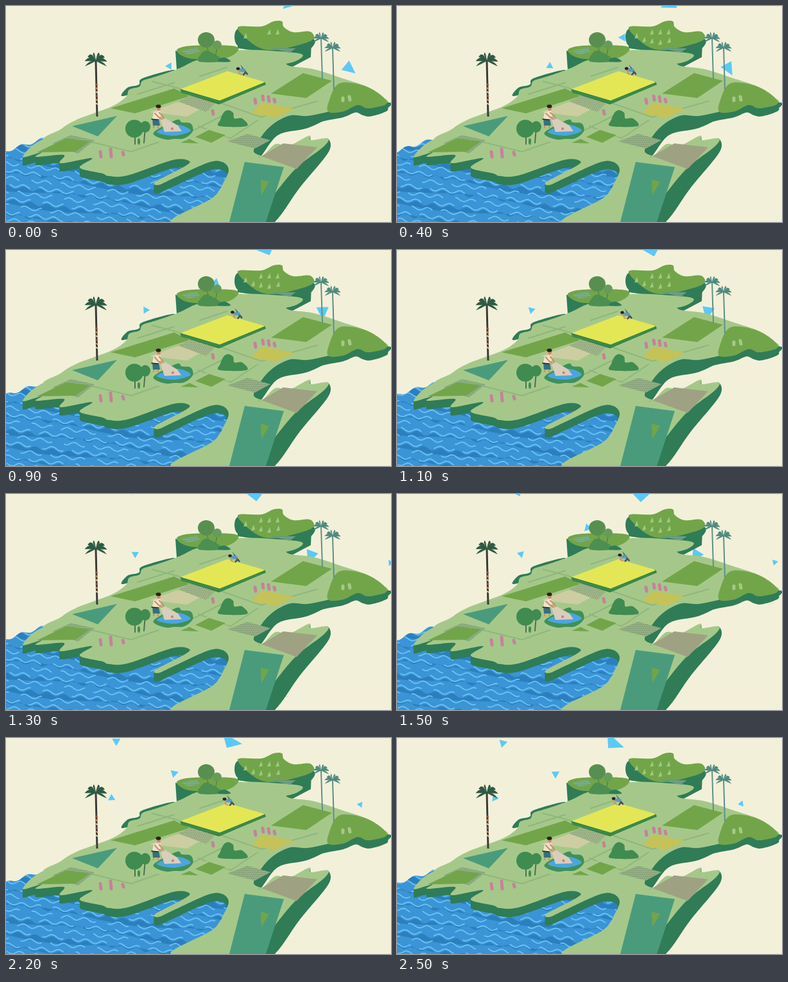
Write an HTML page with a canvas that moves like this. It is 600 by 338 pixels and loops after 2.6 s.

```html
<!DOCTYPE html>
<html lang="en">
<head>
<meta charset="utf-8">
<title>Farmland</title>
<style>
html, body { margin: 0; width: 100%; height: 100%; overflow: hidden; background: #f3f0da; }
canvas { display: block; width: 600px; height: 338px; }
</style>
</head>
<body>
<canvas id="stage" width="600" height="338"></canvas>
<script>
const LOOP = 2600, STEP = 100, W = 600, H = 338, RAD = Math.PI / 180;
const C = { sky: '#f3f0da', light: '#a5c88a', dark: '#2f7c57', field: '#72a549', teal: '#4a9b7c',
  bush: '#3f8b50', pink: '#c6829a', kite: '#5bc9f7', path: '#8fb67c', skin: '#c98f6b', ink: '#25221f' };
const stage = document.getElementById('stage').getContext('2d');
const sheet = document.createElement('canvas');
sheet.width = W;
sheet.height = H;
let g = stage;

const points = s => s.trim().split(/\s+/).map(p => p.split(',').map(Number));

function poly(s) {
  const p = new Path2D();
  points(s).forEach(([x, y]) => p.lineTo(x, y));
  p.closePath();
  return p;
}

// Closed curve through all points (Catmull-Rom)
function blob(s) {
  const q = points(s), n = q.length, p = new Path2D(), at = i => q[(i + n) % n];
  p.moveTo(...q[0]);
  for (let i = 0; i < n; i++) {
    const [a, b, c, d] = [at(i - 1), at(i), at(i + 1), at(i + 2)];
    p.bezierCurveTo(b[0] + (c[0] - a[0]) / 6, b[1] + (c[1] - a[1]) / 6,
      c[0] - (d[0] - b[0]) / 6, c[1] - (d[1] - b[1]) / 6, c[0], c[1]);
  }
  p.closePath();
  return p;
}

function fill(color, path) {
  g.fillStyle = color;
  g.fill(path);
}

function oval(color, x, y, rx, ry = rx) {
  g.fillStyle = color;
  g.beginPath();
  g.ellipse(x, y, rx, ry, 0, 0, 7);
  g.fill();
}

function line(color, width, s, cap = 'round') {
  g.strokeStyle = color;
  g.lineWidth = width;
  g.lineCap = cap;
  g.beginPath();
  points(s).forEach(([x, y]) => g.lineTo(x, y));
  g.stroke();
}

function dotted(path, color, dot) {
  fill(color, path);
  g.save();
  g.clip(path);
  g.fillStyle = dot;
  for (let y = 0; y < H; y += 3)
    for (let x = y % 2; x < W; x += 3) g.fillRect(x, y, 1, 1);
  g.restore();
}

const north = blob(`60,212 85,193 110,178 165,157 187,142 192,131 208,126 213,117 235,110 269,98
  300,84 350,76 362,69 415,72 441,72 438,92 480,99 530,115 562,126 588,143 594,151 565,160 548,153
  526,161 505,165 470,172 440,172 408,192 386,226 397,236 330,235 150,230`);
const south = blob(`26,236 60,208 140,200 300,200 380,228 397,236 420,216 440,219 472,203 475,210
  501,207 495,220 450,256 404,312 376,339 257,339 322,300 339,276 347,256 337,244 315,245 260,270
  238,280 233,275 275,253 286,243 260,241 190,265 160,266 150,262 115,253 134,238 85,246 90,233
  47,236 55,229`);

function palm(x, y, foot, r, leaf, trunk, width) {
  line(trunk, width, `${x},${y} ${x + 2},${foot}`, 'butt');
  for (const a of [-165, -135, -105, -70, -40, -12, 18, 162]) {
    const dx = Math.cos(a * RAD) * r, dy = Math.sin(a * RAD) * r * .8, droop = r * .28;
    const p = new Path2D();
    p.moveTo(x, y);
    p.quadraticCurveTo(x + dx * .6, y + dy - droop, x + dx, y + dy + droop);
    p.quadraticCurveTo(x + dx * .5, y + dy * .6 + r * .18, x, y + 1);
    fill(leaf, p);
  }
}

function drawGround() {
  fill(C.dark, blob('183,141 189,128 207,123 213,113 262,100 240,120'));
  fill(C.dark, poly('264,70 320,84 266,99'));
  fill(C.dark, poly('361,33 361,66 415,74 441,98 475,80 476,55'));
  for (let dy = 1; dy <= 13; dy++) {
    g.save();
    g.translate(0, dy);
    fill(C.dark, north);
    fill(C.dark, south);
    g.restore();
  }
  fill(C.dark, blob(`386,226 408,190 440,171 510,164 594,151 594,161 582,169 560,172
    542,166 510,173 470,191 424,202 396,236`));
  fill(C.dark, blob('501,207 503,228 458,284 414,342 372,342 428,276 492,222'));
  fill(C.light, north);
  fill(C.light, south);
}

function drawHills() {
  fill(C.dark, blob('361,36 361,62 400,68 455,76 474,68 476,50 400,44'));
  fill(C.light, blob('368,70 412,70 462,76 438,90 380,86'));
  fill(C.field, blob('361,34 398,32 417,24 430,24 433,33 448,41 474,40 476,54 425,68 392,64'));
  dotted(poly('412,66 452,66 442,73'), '#6f9f80', '#4b8480');
  fill(C.field, blob('266,69 290,62 350,62 362,69 340,82 286,82'));
  dotted(poly('273,70 298,65 302,72 284,76'), '#7fae7c', '#4b8f86');
  line('#4f6f4c', 1, '313,64 318,78');
  line('#4f6f4c', 1, '329,66 326,80');
  oval('#588f50', 312, 53, 13, 12);
  oval('#669c58', 329, 61, 7);
  fill('#4c8f50', blob('301,87 304,75 314,70 334,81 336,87'));
  fill(C.dark, blob('331,87 334,82 342,81 350,87'));
  fill(C.field, blob('503,166 503,150 520,121 564,127 594,151 565,160 548,155 526,165'));
  line(C.light, 5, '525,144 525,148');
  line(C.light, 5, '535,142 536,147');
}

function drawFields() {
  for (const s of ['302,110 344,96', '228,118 270,129', '205,138 262,120', '335,152 398,174 485,149',
    '285,198 345,168', '300,188 350,207 392,179', '130,212 195,228 238,213']) line(C.path, 2, s);
  fill(C.field, poly('163,160 262,129 286,141 201,168'));
  fill('#cdcda2', poly('224,166 268,150 303,161 282,173'));
  dotted(poly('268,149 290,140 327,151 312,166'), '#a1b488', '#738f6a');
  fill('#33804a', poly('271,130 274,136 332,154 405,123 403,118'));
  fill('#e4e755', poly('272,130 345,102 404,119 333,148'));
  for (let k = 0; k < 1; k += .05) {
    oval('#3f8c47', 274 + k * 58, 134 + k * 16, 1.8);
    oval('#3f8c47', 334 + k * 69, 150 - k * 28, 1.8);
  }
  fill(C.field, poly('413,137 463,105 508,117 468,144'));
  fill('#c5c257', poly('382,168 399,151 449,161 420,175'));
  fill(C.teal, poly('103,188 173,172 143,204'));
  dotted(poly('72,215 101,202 138,210 112,231'), '#8fb082', '#668d6a');
  fill(C.field, poly('48,229 94,207 131,212 108,228'));
  dotted(poly('345,212 376,200 412,210 388,223'), '#94ad82', '#6f8b6c');
  fill('#9fa183', poly('398,235 432,215 485,221 453,255'));
  line(C.light, 3, '294,205 317,192 345,203');
  fill(C.field, poly('295,205 316,194 342,202 320,214'));
  fill(C.field, poly('272,214 286,208 300,215'));
  fill(C.teal, poly('372,244 433,252 405,338 348,338'));
  fill(C.field, poly('397,272 410,275 398,296'));
}

function drawGarden() {
  fill(C.bush, blob('333,188 334,178 339,167 346,163 354,167 356,176 368,176 375,188'));
  line('#4e7150', 2, '201,190 201,216');
  line('#4e7150', 2, '217,190 215,214');
  oval(C.bush, 200, 192, 14);
  oval(C.bush, 217, 189, 8, 9);
  oval(C.bush, 207, 212, 2, 5);
  fill('#3f9058', blob('234,204 232,196 266,178 274,182 288,184 291,196 278,207 262,208 250,209'));
  fill('#4ba5df', blob('235,197 266,186 288,195 262,203'));
  for (const [x, y, h] of points('147,228,8 163,224,12 182,229,4 388,146,6 400,141,6 409,142,7 418,146,4 322,164,5'))
    line(C.pink, 5, `${x},${y} ${x + 1},${y + h}`);
  palm(491, 50, 114, 13, '#4f8a7e', '#5d8f88', 2);
  palm(509, 65, 131, 13, '#4f8a7e', '#5d8f88', 2);
  palm(140, 85, 173, 18, '#2f5a43', '#3b3a38', 3);
  for (let i = 0; i < 6; i++)
    line(['#c4573f', '#e2a04d', '#e8dcc0'][i % 3], 2, `140,${122 + i * 6} 143,${124 + i * 6}`, 'butt');
}

// x, y, angle: start and change per ms; then apex radius, base radius, base angle
const kites = [
  [533, -.044, 96, -.001, 39, .055, 15, 11, 120],
  [254.5, -.0409, 94, 0, 60, -.069, 6.5, 6.5, 120],
  [445, -.0432, -8, .006, 30, .041, 11.8, 18.6, 108],
  [372, -.05, 48, .0033, 77, -.043, 7.2, 7.2, 120],
  [222, -.0228, -18, .0104, -20, .05, 7.5, 7.5, 120],
  [667, -.0522, 112.5, -.0038, 188.5, -.055, 5.5, 5.5, 120]
];

function drawKites(t) {
  for (const [x, vx, y, vy, a, va, tip, base, spread] of kites) {
    const p = new Path2D();
    for (const [r, d] of [[tip, 0], [base, spread], [base, -spread]]) {
      const angle = (a + va * t + d) * RAD;
      p.lineTo(x + vx * t + r * Math.cos(angle), y + vy * t + r * Math.sin(angle));
    }
    fill(C.kite, p);
  }
}

function drawSea(t) {
  const phase = t / LOOP * 4 * Math.PI;
  const sea = new Path2D();
  for (let x = 0; x <= 56; x += 2) sea.lineTo(x, 227 - x * .33 + 2.5 * Math.sin(x / 5 + phase));
  points('90,220 345,240 350,262 300,338 0,338').forEach(p => sea.lineTo(...p));
  g.save();
  g.clip(sea);
  g.fillStyle = '#3b94d6';
  g.fillRect(0, 200, 352, 138);
  g.lineCap = 'round';
  for (let i = 0; i < 17; i++) {
    const base = x => 180 + i * 11 + x * .13;
    const wave = x => base(x) + 2.6 * Math.sin(x / 4.2 + phase + i * 1.9);
    const band = new Path2D(), crest = new Path2D();
    for (let x = 0; x <= 354; x += 2) {
      crest.lineTo(x, wave(x));
      band.lineTo(x, wave(x) + 3);
    }
    for (let x = 354; x >= 0; x -= 6) band.lineTo(x, base(x) + 6 + 5 * Math.sin(x / 45 + i * 2.3));
    if (i % 2) fill('#2c7fbd', band);
    g.strokeStyle = '#68c4f5';
    g.lineWidth = 1.8;
    g.setLineDash([58, 22, 34, 16]);
    g.lineDashOffset = i * 37;
    g.stroke(crest);
    g.setLineDash([]);
  }
  g.restore();
}

function drawSaplings(t) {
  const grow = Math.min(1, t / 300);
  points('373,47 410,41 423,41 397,41 385,53 397,55 410,57 424,54').forEach(([x, y], i) => {
    const k = i < 3 ? 1 : grow;
    fill('#a0c982', poly(`${x - 3 * k},${y + 4} ${x + 1},${y + 4 - 9 * k} ${x + 3 * k},${y + 3}`));
  });
}

function drawReaper(t) {
  const bend = Math.sin(t / LOOP * 6 * Math.PI);
  g.save();
  g.translate(362 - t * .0096, 98.5 - t * .001 + bend);
  line('#3f5262', 2.5, '8,9 11,6 9,2 14,8');
  line('#4a9fd0', 5, '3,2 9,2');
  line(C.skin, 1.6, `3,3 ${1 + bend},7 5,9`);
  line('#c8564a', 1.2, '10,3 13,5');
  oval(C.skin, 0, 1, 2.4);
  oval(C.ink, -.4, -.6, 2.8, 2.2);
  g.restore();
}

function drawFisher(t) {
  const sway = Math.sin(t / LOOP * 4 * Math.PI);
  fill('#d9cdbb', poly(`240,176 247,175 ${268 + sway},187 ${274 + sway},196 247,197`));
  oval('#d3776f', 259 - sway, 192, 2);
  line(C.skin, 2, '231,184 230,190');
  line(C.skin, 2, '237,184 237,191');
  fill('#376f7c', poly('228,176 238,176 240,187 229,187'));
  fill('#efe4c9', poly('230,166 240,164 243,170 238,177 228,177'));
  line(C.skin, 2.2, `239,167 ${244 + sway},172 ${246 + sway},176`);
  line(C.skin, 2.2, `232,168 ${238 + sway},174 ${243 + sway},177`);
  line(C.ink, 1.5, '227,177 236,178');
  oval(C.skin, 238, 160, 3, 4);
  oval(C.ink, 237.5, 157, 4, 2.8);
}

function frame(now) {
  const t = Math.floor(now % LOOP / STEP) * STEP;
  g.fillStyle = C.sky;
  g.fillRect(0, 0, W, H);
  drawKites(t);
  drawSea(t);
  g.drawImage(sheet, 0, 0);
  drawSaplings(t);
  drawReaper(t);
  drawFisher(t);
  requestAnimationFrame(frame);
}

g = sheet.getContext('2d');
drawGround();
drawHills();
drawFields();
drawGarden();
g = stage;
requestAnimationFrame(frame);
</script>
</body>
</html>
```
